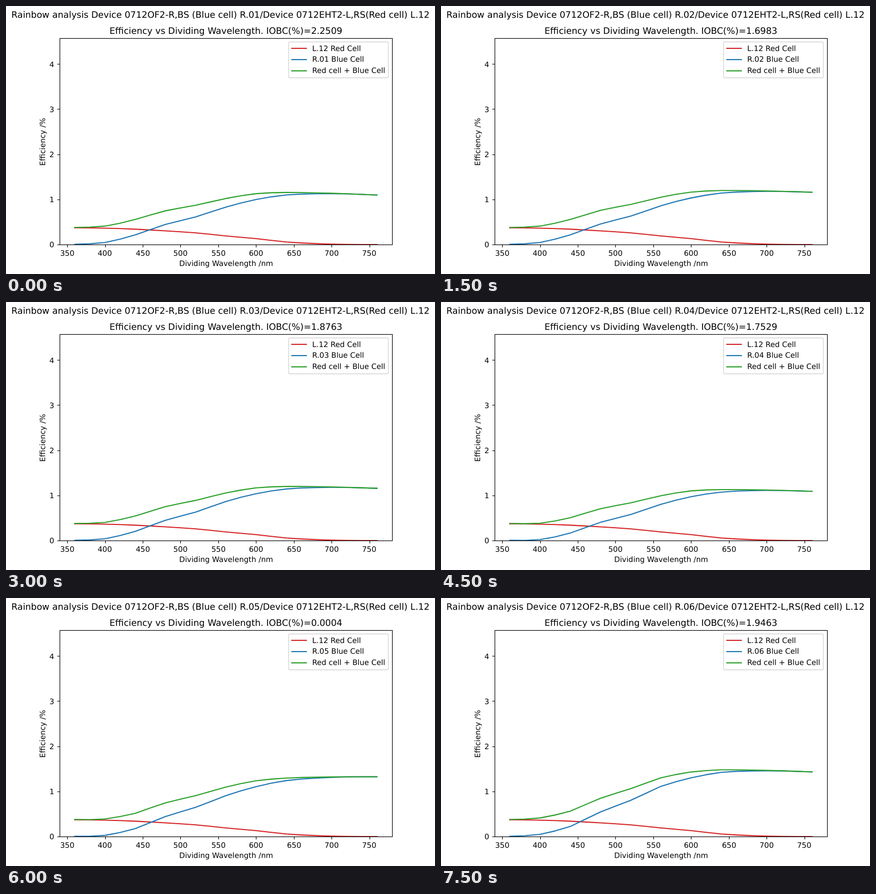
Recreate the animation shown at these times as an HTML page with a canvas. Size 800 px wide and 500 px high, loop 8000 ms.

```html
<!DOCTYPE html>
<html lang="en">
<head>
<meta charset="utf-8">
<title>Efficiency vs Dividing Wavelength</title>
<style>
  html, body { margin: 0; width: 100%; height: 100%; overflow: hidden; background: #fff; }
  canvas { display: block; width: 800px; height: 500px; }
</style>
</head>
<body>
<canvas id="chart" width="800" height="500"></canvas>
<script>
const ctx = document.getElementById('chart').getContext('2d');
ctx.textRendering = 'geometricPrecision';

const STEP = 1500, LOOP = 8000;
const BOX = { left: 100, top: 60, right: 720, bottom: 445 };
const RED = '#d62728', BLUE = '#1f77b4', GREEN = '#2ca02c';
const SMALL = 13.89, LARGE = 16.67;

// Key efficiencies in %, one every 40 nm from 360 to 760 nm
const RED_KEYS = [.373, .363, .34, .302, .259, .19, .13, .056, .019, .003, 0];
const BLUE_KEYS = [.004, .045, .215, .445, .611, .83, .997, 1.098, 1.125, 1.122, 1.097];

// Each run lifts the blue curve by these amounts at the LIFT_NM wavelengths
const LIFT_NM = [360, 440, 560, 640, 760];
const RUNS = [
  { iobc: '2.2509', lift: [0, 0, 0, 0, 0] },
  { iobc: '1.6983', lift: [0, 0, .028, .042, .061] },
  { iobc: '1.8763', lift: [0, -.012, .035, .044, .06] },
  { iobc: '1.7529', lift: [0, -.05, -.027, -.026, -.007] },
  { iobc: '0.0004', lift: [0, -.04, .075, .142, .228] },
  { iobc: '1.9463', lift: [0, .007, .282, .325, .335] }
];

const wavelengths = Array.from({ length: 21 }, (_, i) => 360 + 20 * i);
const xAt = nm => 128.18 + (nm - 360) * 1.40909;
const yAt = eff => BOX.bottom - eff * 84.17;
const snap = v => Math.round(v) + 0.5;

// Smooth curve through evenly spaced keys
function spline(keys, nm) {
  const last = keys.length - 1;
  const pos = (nm - 360) / 40;
  const i = Math.min(Math.floor(pos), last - 1);
  const t = pos - i;
  const slope = k => {
    const a = Math.max(k - 1, 0), b = Math.min(k + 1, last);
    return (keys[b] - keys[a]) / (b - a);
  };
  const ease = t * t * (3 - 2 * t);
  return keys[i] + (keys[i + 1] - keys[i]) * ease
    + t * (1 - t) * (slope(i) * (1 - t) - slope(i + 1) * t);
}

function liftAt(lift, nm) {
  const i = Math.max(1, LIFT_NM.findIndex(v => v >= nm));
  const t = (nm - LIFT_NM[i - 1]) / (LIFT_NM[i] - LIFT_NM[i - 1]);
  return lift[i - 1] + (lift[i] - lift[i - 1]) * t;
}

// align: 0 = left, 0.5 = centre, 1 = right; the ink starts on a whole pixel
function text(str, x, y, size, align) {
  ctx.font = size + 'px "DejaVu Sans", sans-serif';
  ctx.fillStyle = '#000';
  const m = ctx.measureText(str);
  const bearing = -m.actualBoundingBoxLeft;
  const left = Math.round(x - m.width * align + bearing) - Math.floor(bearing);
  ctx.fillText(str, left, y);
}

function line(points, color, width, cap) {
  ctx.strokeStyle = color;
  ctx.lineWidth = width;
  ctx.lineCap = cap;
  ctx.lineJoin = 'round';
  ctx.beginPath();
  for (const [x, y] of points) ctx.lineTo(x, y);
  ctx.stroke();
}

function curve(effAt, color) {
  line(wavelengths.map(nm => [xAt(nm), yAt(effAt(nm))]), color, 2.08, 'square');
}

function drawCurves(lift) {
  const red = nm => spline(RED_KEYS, nm);
  const blue = nm => Math.max(0, spline(BLUE_KEYS, nm) + liftAt(lift, nm));
  ctx.save();
  ctx.beginPath();
  ctx.rect(BOX.left, BOX.top, BOX.right - BOX.left, BOX.bottom - BOX.top);
  ctx.clip();
  curve(red, RED);
  curve(blue, BLUE);
  curve(nm => red(nm) + blue(nm), GREEN);
  ctx.restore();
}

function drawAxes() {
  for (let nm = 350; nm <= 750; nm += 50) {
    const x = snap(xAt(nm));
    line([[x, 445.5], [x, 450.4]], '#000', 1.11, 'butt');
    text(String(nm), xAt(nm), 466, SMALL, 0.5);
  }
  for (let eff = 0; eff <= 4; eff++) {
    const y = snap(yAt(eff));
    line([[95.6, y], [100.5, y]], '#000', 1.11, 'butt');
    text(String(eff), 90.28, Math.round(yAt(eff) + 5.45), SMALL, 1);
  }
  ctx.strokeStyle = '#000';
  ctx.lineWidth = 1.11;
  ctx.lineJoin = 'miter';
  ctx.strokeRect(100.5, 60.5, 620, 385);

  text('Dividing Wavelength /nm', 410, 485, SMALL, 0.5);
  ctx.save();
  ctx.translate(73, 253);
  ctx.rotate(-Math.PI / 2);
  text('Efficiency /%', 0, 0, SMALL, 0.5);
  ctx.restore();
}

function drawLegend(cell) {
  ctx.beginPath();
  ctx.roundRect(527, 66.94, 186.06, 67, 2.8);
  ctx.fillStyle = 'rgba(255,255,255,.8)';
  ctx.fill();
  ctx.strokeStyle = 'rgba(204,204,204,.8)';
  ctx.lineWidth = 1.39;
  ctx.stroke();

  const rows = [['L.12 Red Cell', RED], [cell + ' Blue Cell', BLUE], ['Red cell + Blue Cell', GREEN]];
  rows.forEach(([label, color], i) => {
    const y = 79 + 21 * i;
    line([[533, y], [560, y]], color, 2.08, 'square');
    text(label, 571.4, Math.round(83.5 + 20.94 * i), SMALL, 0);
  });
}

function draw(index) {
  const run = RUNS[index];
  const cell = 'R.0' + (index + 1);
  ctx.fillStyle = '#fff';
  ctx.fillRect(0, 0, 800, 500);
  drawCurves(run.lift);
  drawAxes();
  drawLegend(cell);
  text(`Rainbow analysis Device 0712OF2-R,BS (Blue cell) ${cell}/Device 0712EHT2-L,RS(Red cell) L.12`,
    400, 22, LARGE, 0.5);
  text('Efficiency vs Dividing Wavelength. IOBC(%)=' + run.iobc, 410, 52, LARGE, 0.5);
}

function tick() {
  draw(Math.floor(performance.now() % LOOP / STEP));
  requestAnimationFrame(tick);
}
tick();
</script>
</body>
</html>
```
